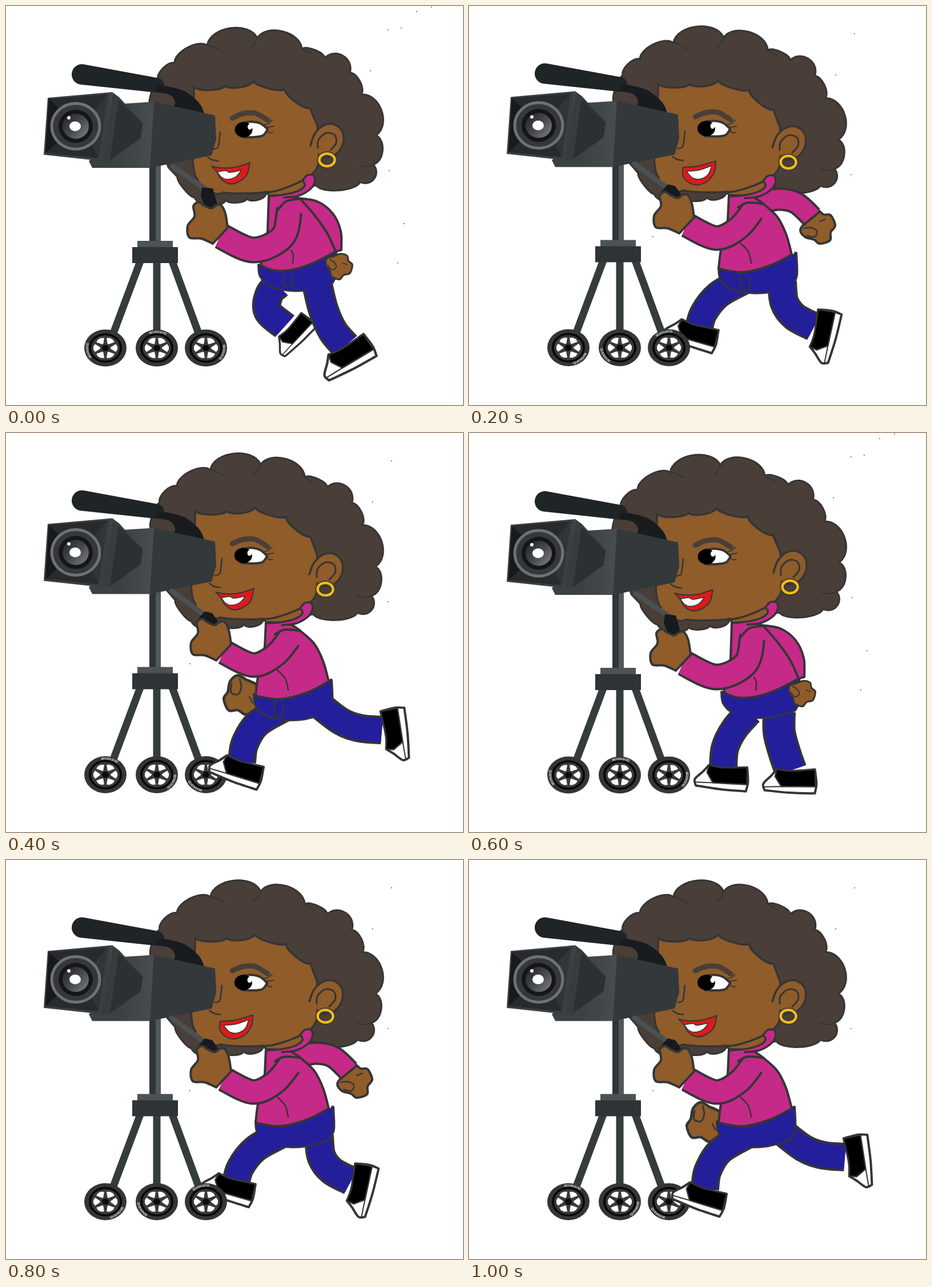
Animation of 800x700 px, one loop 1.2 s. Source, as an HTML page with a canvas:

```html
<!DOCTYPE html>
<html lang="en">
<head>
<meta charset="utf-8">
<title>Camera run</title>
<style>
html, body { margin: 0; width: 100%; height: 100%; overflow: hidden; background: #fff; }
canvas { display: block; }
</style>
</head>
<body>
<canvas id="stage" width="800" height="700"></canvas>
<script>
const ctx = document.getElementById('stage').getContext('2d');
const INK = '#353535', HAIR = '#493f38', SKIN = '#8f5c2a', PINK = '#c52a88',
      BLUE = '#231f9b', RED = '#dd1a1a', GOLD = '#f2b91c';

const points = text => text.trim().split(/\s+/).map(s => s.split(',').map(Number));

// Smooth curve through "x,y" points; "|" marks a corner.
function curve(text) {
  const path = new Path2D();
  let last = null;
  for (const part of text.split('|')) {
    const p = points(part);
    if (last) p.unshift(last); else path.moveTo(...p[0]);
    for (let i = 0; i < p.length - 1; i++) {
      const a = p[i - 1] || p[i], b = p[i], c = p[i + 1], d = p[i + 2] || c;
      path.bezierCurveTo(b[0] + (c[0] - a[0]) / 6, b[1] + (c[1] - a[1]) / 6,
        c[0] - (d[0] - b[0]) / 6, c[1] - (d[1] - b[1]) / 6, ...c);
    }
    last = p[p.length - 1];
  }
  return path;
}

// Chain of arcs through "x,y,bulge" points, clockwise; bulge is relative to the chord.
function puffs(text) {
  const path = new Path2D(), p = points(text);
  path.moveTo(p[0][0], p[0][1]);
  for (let i = 1; i < p.length; i++) {
    const [x0, y0] = p[i - 1], [x, y, bulge = 0] = p[i];
    const dx = x - x0, dy = y - y0, h = bulge * 4 / 3, e = 0.12;
    path.bezierCurveTo(x0 + e * dx + h * dy, y0 + e * dy - h * dx,
      x - e * dx + h * dy, y - e * dy - h * dx, x, y);
  }
  return path;
}

function stroke(path, width, color = INK, cap = 'round') {
  ctx.strokeStyle = color;
  ctx.lineWidth = width;
  ctx.lineCap = cap;
  ctx.stroke(path);
}
function paint(path, fill, width = 4) {
  ctx.fillStyle = fill;
  ctx.fill(path);
  if (width) stroke(path, width);
}
const line = (text, width = 2.5, color = INK) => stroke(curve(text), width, color);
const shape = (text, fill, width) => paint(curve(text), fill, width);

function limb(text, width, color) {
  const path = curve(text);
  stroke(path, width + 4, INK, 'butt');
  stroke(path, width - 4, color, 'butt');
}
function poly(text, fill) {
  ctx.beginPath();
  points(text).forEach(p => ctx.lineTo(...p));
  ctx.fillStyle = fill;
  ctx.fill();
}
function oval(x, y, rx, ry, fill, edge, width) {
  const path = new Path2D();
  path.ellipse(x, y, rx, ry, 0, 0, Math.PI * 2);
  if (fill) paint(path, fill, 0);
  if (edge) stroke(path, width, edge);
}
function capsule(x0, y0, r0, x1, y1, r1, fill) {
  const a = Math.atan2(y1 - y0, x1 - x0), q = Math.PI / 2;
  ctx.beginPath();
  ctx.arc(x0, y0, r0, a + q, a - q);
  ctx.arc(x1, y1, r1, a - q, a + q);
  ctx.fillStyle = fill;
  ctx.fill();
}
function blend(x0, y0, x1, y1, ...colors) {
  const g = ctx.createLinearGradient(x0, y0, x1, y1);
  colors.forEach((c, i) => g.addColorStop(i / (colors.length - 1), c));
  return g;
}
function at(x, y, degrees, size, paintIt) {
  ctx.save();
  ctx.translate(x, y);
  ctx.rotate(degrees * Math.PI / 180);
  ctx.scale(size, size);
  paintIt();
  ctx.restore();
}

function shoe(x, y, angle, size = 1) {
  at(x, y, angle, size, () => {
    shape('-24,-28 0,-26 43,-31 | 47,-6 45,11 | 0,12 -43,10 | -46,-1 -33,-16 -24,-28', '#fff');
    line('-14,2 -45,4', 2);
    shape('-24,-28 0,-26 43,-31 | 46,-1 | -14,2 | -26,-15 | -24,-28', '#000', 2.5);
  });
}
function fist(x, y, angle, size) {
  at(x, y, angle, size, () => {
    shape('-22,-8 -13,-23 1,-29 11,-22 23,-21 31,-3 23,9 22,23 4,29 -6,22 -22,17 -30,5 -22,-8', SKIN);
    line('-24,2 -11,1 -1,7 -5,17 -18,15');
    line('4,-10 14,-14', 2);
  });
}

function face() {
  paint(puffs('252,176 266,130,.1 295,100,.2 352,69,.2 440,56,.27 518,75,.27 558,91,.15 602,117,.38 622,155,.2 648,227,.31 643,278,.27 620,309,.42 543,315,.15 455,330 422,338,.2 385,341,.15 330,336,.2 300,300,.1 284,283 252,176'), HAIR, 3);
  line('352,69 362,71 377,79', 2);
  line('440,56 435,67 428,74', 2);
  line('518,75 526,80 535,84', 2);
  line('643,278 632,282 618,280', 2);
  shape('460,322 462,334 490,332 520,322 533,300', SKIN, 3);
  paint(puffs('329,142 384,140,-.12 433,132,-.14 488,146,-.1 532,179,-.12 545,210 548,265 540,290,.1 455,326,.08 380,327,.03 336,305,.2 329,265,.1 329,142'), SKIN, 3.5);
  shape('533,245 540,225 555,210 572,207 587,217 591,235 585,252 574,263 | 555,266', SKIN, 3.5);
  line('546,249 547,235 560,223 575,226 578,240 568,253', 3);
  oval(562, 270, 13.5, 11, null, INK, 8);
  oval(562, 270, 13.5, 11, null, GOLD, 4.5);
  line('396,197 414,189 436,188 458,200', 9, HAIR);
  shape('412,206 428,203 445,206 458,216 | 450,227 434,230 414,230', '#fff');
  oval(416, 217, 15.5, 13.5, '#000');
  oval(427, 212, 4, 5, '#fff');
  line('451,209 460,206 466,200', 1.8);
  line('456,213 469,211', 1.8);
  line('456,217 461,222 467,222', 1.8);
}

function mouth(open) {
  if (open) {
    shape('375,283 400,281 432,272 | 430,290 418,307 398,314 382,308 374,296 375,283', RED, 2);
    shape('381,290 402,288 425,280 | 419,295 407,303 392,302 381,290', '#fff', 1.5);
  } else {
    shape('360,281 375,284 400,283 427,275 | 421,297 406,309 391,312 377,304 369,291 360,281', RED, 2);
    shape('370,291 385,289 392,292 412,288 | 403,299 388,304 377,300 370,291', '#fff', 1.5);
  }
}

function head(pose) {
  ctx.save();
  if (pose) {
    ctx.translate(464, 200);
    ctx.rotate(0.041);
    ctx.translate(-464, -200);
  }
  face();
  ctx.restore();
  ctx.save();
  if (pose) ctx.translate(3, -1);
  line('375,221 373,238 371,248 363,251');
  line('353,265 361,270 372,272');
  if (pose === 2) ctx.translate(4, -1);
  if (pose === 1) ctx.translate(-3, 1);
  mouth(pose === 1);
  ctx.restore();
}

function wheel(x, angle) {
  ctx.save();
  ctx.translate(x, 600);
  ctx.scale(1, 0.89);
  oval(0, 0, 37, 36.5, '#353535');
  oval(0, 0, 27, 27, '#3a3a3a', '#080808', 4);
  for (let k = 0; k < 6; k++) {
    poly('9,-1 18,-8 21,-3 21,3 18,8 9,1', '#fff');
    ctx.rotate(Math.PI / 3);
  }
  oval(0, 0, 6, 6, '#0b0b0b');
  ctx.font = 'bold 6px "Liberation Sans", Arial, sans-serif';
  ctx.textAlign = 'center';
  ctx.fillStyle = '#e8e8e8';
  [...'QUENDOB'].forEach((ch, i) => {
    ctx.save();
    ctx.rotate(angle * Math.PI / 180 + (3 - i) * 0.14);
    ctx.translate(34, 0);
    ctx.rotate(-Math.PI / 2);
    ctx.fillText(ch, 0, 0);
    ctx.restore();
  });
  ctx.restore();
}

function rig(pose) {
  ctx.save();
  if (pose) ctx.translate(0, -1.5);
  poly('251,280 262,280 262,414 251,414', '#2f3437');
  poly('262,280 271,280 271,414 262,414', '#525759');
  for (const [top, foot] of [[235, 188], [264, 264], [291, 337]]) {
    ctx.beginPath();
    ctx.moveTo(top, 448);
    ctx.lineTo(foot, 574);
    ctx.strokeStyle = '#363b3e';
    ctx.lineWidth = 13;
    ctx.stroke();
  }
  poly('230,412 292,412 292,424 230,424', '#4d5254');
  poly('221,423 301,423 301,451 221,451', '#2e3336');

  capsule(133, 120, 18, 264, 139, 13, '#1f2427');
  shape('264,140 278,140 | 312,149 338,170 348,191 | 291,181 | 296,169 287,156 264,151', '#181c1f', 0);
  poly('196,172 259,168 256,284 151,284 145,272 180,240', blend(196, 0, 256, 0, '#3b4043', '#474c4e'));
  poly('259,168 366,192 368,234 360,262 252,284', '#33383b');
  poly('186,151 198,160 240,206 236,232 182,272 167,271', '#373c3e');
  poly('197,165 239,206 235,232 182,270', '#2b3033');
  poly('73,161 186,151 168,272 66,261', '#3a3f41');
  poly('75,163 178,155 162,267 69,258', '#272b2d');
  poly('75,163 94,181 88,241 69,258', '#17191b');
  poly('178,155 156,180 151,244 162,267', '#303537');
  oval(122, 211, 42, 40, '#34383a', '#6d7275', 5);
  oval(122, 211, 30, 29, '#141618');
  oval(122, 211, 23, 22, blend(105, 195, 140, 228, '#2a2d2f', '#45494b', '#737779'));
  oval(121, 211, 10, 8.5, '#fff');
  oval(110, 196, 3, 3, '#fff');
  ctx.restore();

  ctx.save();
  if (pose) ctx.translate(0, -0.6);
  [174, 264, 350].forEach((x, i) => wheel(x, 170 + 103 * i - 123 * pose));
  ctx.restore();
}

// Hip offset, then centre line, width and shoe of each leg.
const STRIDES = [
  { hip: [0, 0],
    left: ['475,490 461,505 458,535 488,562', 47, [509, 583, -44, 0.85]],
    right: ['543,480 555,531 572,570 594,596', 50, [601, 626, -28, 1.06]] },
  { hip: [-5, 4],
    left: ['480,482 436,507 410,540 402,570', 46, [386, 584, 19]],
    right: ['548,485 552,520 570,545 604,563', 48, [630, 582, -75]] },
  { hip: [-8, 4],
    left: ['485,483 440,510 418,545 413,576', 46, [400, 600, 20]],
    right: ['540,470 585,505 620,518 658,521', 46, [691, 528, -96]] },
  { hip: [0, 0],
    left: ['490,490 464,520 448,553 445,590', 46, [441, 613, 6]],
    right: ['543,490 543,525 552,560 563,592', 54, [561, 619, 3]] }
];

function legs(step) {
  const { hip, left, right } = STRIDES[step < 4 ? step : step - 3];
  const leftNear = step > 2;
  const [far, near] = leftNear ? [right, left] : [left, right];
  const hips = new Path2D();
  hips.addPath(curve('443,455 446,474 463,490 495,498 530,497 570,486 | 578,468 577,430'), new DOMMatrix().translate(...hip));
  limb(far[0], far[1], BLUE);
  shoe(...far[2]);
  stroke(hips, 6);
  limb(near[0], near[1], BLUE);
  paint(hips, BLUE, 0);
  shoe(...near[2]);
  if (!leftNear) {
    ctx.save();
    ctx.translate(hip[0] * 2, hip[1]);
    line('487,467 485,480 490,491 500,492 501,470');
    ctx.restore();
  }
}

function hood() {
  shape('460,333 485,331 510,325 523,315 519,306 | 527,297 537,296 | 541,305 534,320 512,333 487,336', PINK, 3.5);
}

function torso(pose) {
  if (pose === 0) {
    fist(582, 455, 40, 0.78);
    shape('510,337 545,343 572,364 586,395 587,428 | 576,431', PINK);
    shape('460,333 458,395 | 446,455 | 470,464 505,462 542,449 577,431 | 563,400 541,368 515,338 | 490,333 460,333', PINK);
    hood();
    line('499,429 503,437 502,451');
    return;
  }
  if (pose === 1) {
    fist(610, 388, 0, 1);
    limb('505,347 540,339 572,345 601,371', 37, PINK);
    line('614,361 588,382', 4);
  }
  shape('455,332 453,375 | 441,428 437,461 | 480,467 528,455 565,436 | 555,400 539,369 514,346 | 493,334 455,332', PINK);
  ctx.save();
  ctx.translate(-4, 1);
  hood();
  ctx.restore();
  line('475,416 489,431 494,451');
}

function nearArm(pose) {
  if (pose) {
    line('290,277 | 347,319', 9, '#4b5053');
    poly('337,325 348,313 361,316 371,330 360,344 342,340', '#16191d');
    limb('381,384 432,407 471,390 497,359', 41, PINK);
    line('471,353 488,345 514,347', 4);
    ctx.translate(6, -18);
  } else {
    line('292,282 | 352,323', 9, '#4b5053');
    poly('343,318 362,320 371,352 350,354 341,334', '#16191d');
    limb('375,403 433,428 484,405 496,358', 43, PINK);
    line('474,360 490,343 515,338', 4);
  }
  shape('345,349 337,344 328,351 330,369 318,386 321,406 342,408 362,417 | 388,389 | 384,364 376,349 367,350 359,355 345,349', SKIN);
}

function specks(pose) {
  const spots = pose ? '674,48 641,120 668,295 321,404'
    : '718,9 744,1 668,41 691,38 637,113 670,288 696,381 685,450';
  ctx.fillStyle = '#333';
  for (const [x, y] of points(spots)) ctx.fillRect(x, y, 1.5, 1.5);
}

function draw(now) {
  const step = Math.floor((now % 1200) / 200), pose = step % 3;
  ctx.setTransform(1, 0, 0, 1, 0, 0);
  ctx.fillStyle = '#fff';
  ctx.fillRect(0, 0, 800, 700);
  ctx.lineJoin = 'round';
  specks(pose);
  head(pose);
  if (pose < 2) legs(step);
  rig(pose);
  if (pose === 2) {
    fist(414, 459, 85, 1.15);
    legs(step);
  }
  torso(pose);
  nearArm(pose);
}

function tick() {
  draw(performance.now());
  requestAnimationFrame(tick);
}
tick();
</script>
</body>
</html>
```
